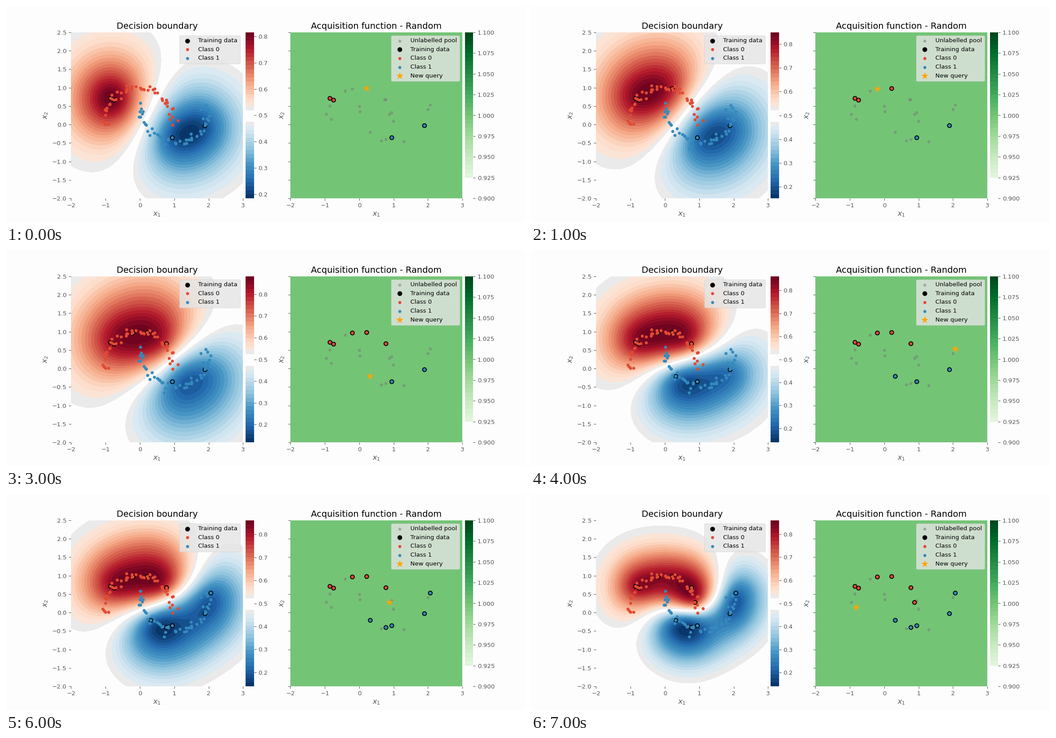
A matplotlib script for the animation above (8 s loop, 1159x483 px).

```python
import numpy as np
import matplotlib.pyplot as plt
from matplotlib.animation import FuncAnimation

W, H = 1159, 483
LEFT, TOP, WIDE, HIGH = 145.3, 59, 384, 371
PAPER, RED, BLUE = "#fdfdfd", "#e24a33", "#348abd"
STEPS = 8

rng = np.random.default_rng(4)


def upper_moon(t):
    return np.c_[np.cos(t), np.sin(t)]


def lower_moon(t):
    return np.c_[1 - np.cos(t), .5 - np.sin(t)]


# Two noisy half moons, and an unlabelled pool on the same curves
angles = np.linspace(0, np.pi, 48)
class_0 = upper_moon(angles) + rng.normal(0, .07, (48, 2))
class_1 = lower_moon(angles) + rng.normal(0, .07, (48, 2))
pool = np.vstack([upper_moon([.1, .34, .75, 2, 2.6, 2.86]),
                  lower_moon([0, .15, 1.2, 1.87, 3.05])])

# Labelled points: the starting set, then one query per step
START = 4
labelled = np.array([(-.86, .715), (-.75, .665), (.94, -.35), (1.885, -.025),
                     (.21, .98), (-.205, .975), (.765, .68), (.31, -.21),
                     (2.06, .54), (.765, -.4), (.875, .28), (-.82, .15)])
is_red = np.array([c == "r" for c in "rrbbrrrbbbrr"])


def sigmoid(z):
    return 1 / (1 + np.exp(-z))


class Classifier:
    """Gaussian process classifier with the Laplace approximation."""

    def __init__(self, x, t, log_variance, log_length):
        self.x, self.t = x, t
        self.variance, self.length = np.exp([log_variance, log_length])
        k = self.kernel(x)
        f = np.zeros(len(x))
        for _ in range(20):
            p, s, inner = self.curvature(f, k)
            b = s * s * f + t - p
            f = k @ (b - s * np.linalg.solve(inner, s * (k @ b)))
        self.p, self.s, self.inner = self.curvature(f, k)
        self.evidence = (-f @ (t - self.p) / 2
                         - np.logaddexp(0, np.where(t, -f, f)).sum()
                         - np.linalg.slogdet(self.inner)[1] / 2)

    def kernel(self, points):
        d2 = ((points[:, None] - self.x[None]) ** 2).sum(-1)
        return self.variance * np.exp(-d2 / (2 * self.length ** 2))

    def curvature(self, f, k):
        p = sigmoid(f)
        s = np.sqrt(p * (1 - p))
        return p, s, np.eye(len(f)) + s[:, None] * k * s

    def predict(self, points):
        k = self.kernel(points)
        sk = (k * self.s).T
        mean = k @ (self.t - self.p)
        var = self.variance - (sk * np.linalg.solve(self.inner, sk)).sum(0)
        spread = np.sqrt(2 * np.maximum(var, 0))
        nodes, weights = np.polynomial.hermite.hermgauss(24)
        return sum(w * sigmoid(mean + spread * n)
                   for n, w in zip(nodes, weights)) / np.sqrt(np.pi)


def fit(step):
    """Search the kernel with the highest evidence, coarse to fine."""
    n = START + step
    x, t = labelled[:n], is_red[:n].astype(float)
    centre, reach = np.array([3, 0.]), np.array([3, .8])
    for _ in range(4):
        offsets = np.linspace(-1, 1, 9)
        models = [Classifier(x, t, *(centre + reach * (u, v)))
                  for u in offsets for v in offsets]
        best = max(models, key=lambda m: m.evidence)
        centre = np.log([best.variance, best.length])
        reach = reach / 3
    return best


grid_x, grid_y = np.meshgrid(np.linspace(-2, 3, 200), np.linspace(-2, 2.5, 180))
grid = np.c_[grid_x.ravel(), grid_y.ravel()]
fields = [fit(step).predict(grid).reshape(grid_x.shape) - .5 for step in range(STEPS)]
spans = [np.abs(field).max() for field in fields]

# Bands over the range -1..1, with a pale gap around the middle
levels = np.r_[np.linspace(-1, -.08, 20), np.linspace(.06, 1, 20)]
edges = levels.copy()
edges[[0, -1]] = -1.001, 1.001


def tint(v):
    if abs(v) < .03:
        return PAPER
    return "#eaeaea" if abs(v) < .11 else plt.cm.RdBu_r((v + 1) / 2)


tints = [tint(v) for v in (levels[1:] + levels[:-1]) / 2]

plt.style.use("ggplot")
plt.rcParams.update({"font.family": "DejaVu Sans", "font.size": 9.66,
                     "axes.grid": False})
fig = plt.figure(figsize=(W / 100, H / 100), dpi=100, facecolor=PAPER)


def add_axes(x, width, face=PAPER):
    ax = fig.add_axes([x / W, 1 - (TOP + HIGH) / H, width / W, HIGH / H], facecolor=face)
    ax.spines[:].set_visible(False)
    return ax


def add_panel(x, title, face=PAPER):
    ax = add_axes(x, WIDE, face)
    ax.set_title(title)
    ax.set_xlabel("$x_1$")
    ax.set_ylabel("$x_2$")
    ax.set_xticks(range(-2, 4))
    ax.set_yticks(np.arange(-2, 2.6, .5))
    return ax


def add_bar(x, ticks, form):
    ax = add_axes(x, 18.5)
    ax.yaxis.tick_right()
    ax.set_xticks([])
    ax.set_yticks(ticks)
    ax.yaxis.set_major_formatter(form)
    ax.set_xlim(0, 1)
    return ax


def dots(ax, color, size=24, points=(), **kw):
    points = np.reshape(points, (-1, 2))
    return ax.scatter(points[:, 0], points[:, 1], s=size, color=color,
                      linewidths=0, **kw)


left = add_panel(LEFT, "Decision boundary")
right = add_panel(LEFT + 490, "Acquisition function - Random", "#74c476")
right.tick_params(labelleft=False)
left_bar = add_bar(535, np.arange(.2, .85, .1), "{x:.1f}")
right_bar = add_bar(1024.5, np.arange(.9, 1.11, .025), "{x:.3f}")

left_known = [dots(left, "black", 58, label="Training data"),
              dots(left, RED), dots(left, BLUE)]
dots(left, RED, points=class_0, label="Class 0")
dots(left, BLUE, points=class_1, label="Class 1")

right_pool = dots(right, "#777777", alpha=.5, label="Unlabelled pool")
right_known = [dots(right, "black", 58, label="Training data"),
               dots(right, RED, label="Class 0"),
               dots(right, BLUE, label="Class 1")]
star = dots(right, "orange", 150, marker="*", label="New query")

for ax in (left, right):
    ax.set(xlim=(-2, 3), ylim=(-2, 2.5))
    ax.legend(loc="upper right")

greens = np.linspace(.9, 1.1, 41)
for low, high in zip(greens, greens[1:]):
    place = (low + high - 1.8) / .4
    right_bar.axhspan(low, high, lw=0, antialiased=False,
                      color=plt.cm.Greens(place) if place > .125 else PAPER)
right_bar.set_ylim(.9, 1.1)

bands = []


def fill(ax, x, y, z):
    bands.append(ax.contourf(x, y, z, edges, colors=tints, zorder=0))


def update(step):
    while bands:
        bands.pop().remove()
    span = spans[step]
    fill(left, grid_x, grid_y, fields[step] / span)
    fill(left_bar, [0, 1], .5 + span * levels, np.c_[levels, levels])
    left_bar.set_ylim(.5 - span, .5 + span)

    n = START + step
    known, red = labelled[:n], is_red[:n]
    for rings, reds, blues in (left_known, right_known):
        rings.set_offsets(known)
        reds.set_offsets(known[red])
        blues.set_offsets(known[~red])
    right_pool.set_offsets(np.vstack([pool, labelled[n + 1:]]))
    star.set_offsets(labelled[n:n + 1])
    return []


anim = FuncAnimation(fig, update, frames=STEPS, interval=1000, repeat=True, repeat_delay=0)
plt.show()
```
